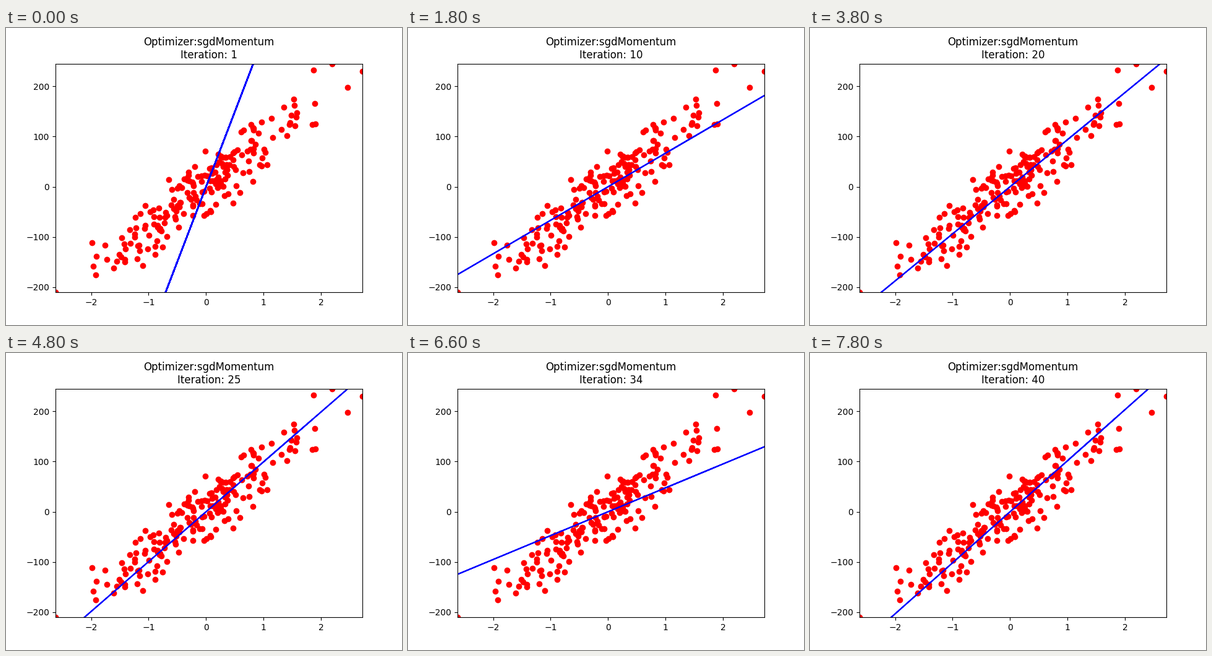
Animation of 640x480 px, one loop 8000 ms. Source, as a matplotlib script:

```python
import numpy as np
import matplotlib.pyplot as plt
from matplotlib.animation import FuncAnimation

SAMPLES = 200
NOISE = 30
STEPS = 40
RATE = 2.0
MOMENTUM = 0.9


def make_data():
    """Noisy linear data through the origin, in shuffled order."""
    rng = np.random.RandomState(42)
    x = rng.standard_normal(SAMPLES)
    slope = 100 * rng.uniform()
    y = slope * x + rng.normal(scale=NOISE, size=SAMPLES)
    order = np.arange(SAMPLES)
    rng.shuffle(order)
    return x[order], y[order]


def descend(x, y):
    """Slope after each step of gradient descent with momentum."""
    w = v = 0.0
    slopes = []
    for _ in range(STEPS):
        grad = 2 * np.mean((w * x - y) * x)
        v = MOMENTUM * v + RATE * grad
        w -= v
        slopes.append(w)
    return slopes


x, y = make_data()
slopes = descend(x, y)

fig, ax = plt.subplots(figsize=(6.4, 4.8), dpi=100)
ax.scatter(x, y, color="red")
line, = ax.plot(x, slopes[0] * x, color="blue")
ax.set_xlim(x.min(), x.max())
ax.set_ylim(y.min(), y.max())
title = ax.set_title("")


def update(i):
    line.set_ydata(slopes[i] * x)
    title.set_text(f"Optimizer:sgdMomentum\nIteration: {i + 1}")
    return line, title


anim = FuncAnimation(fig, update, frames=STEPS, interval=200, repeat=True)
plt.show()
```
